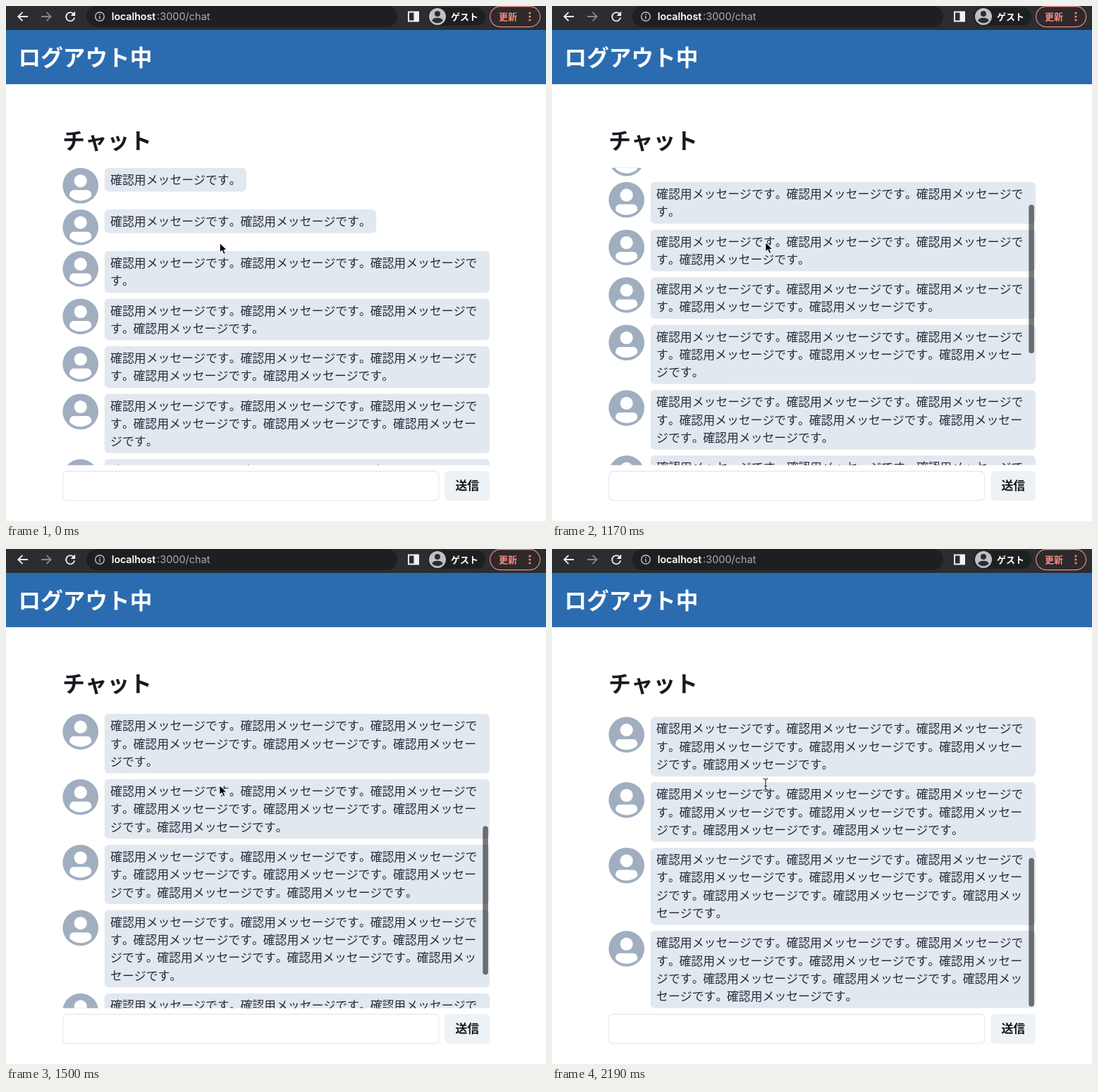
Animation, 766 px wide and 731 px high, one loop 2.22 s. Source, as an HTML page:

```html
<!DOCTYPE html>
<html lang="ja">
<head>
<meta charset="utf-8">
<title>チャット</title>
<style>
  html, body { margin: 0; width: 100%; height: 100%; overflow: hidden; background: #fff; }
  svg { display: block; }
  text { font-family: "Noto Sans CJK JP", "Noto Sans CJK", sans-serif; fill: #17191f; font-kerning: none; }
  .msg { font-size: 16.88px; font-weight: 300; fill: #262c38; }
  .title { font-size: 31.65px; font-weight: 700; }
  .url { font-family: Inter, Roboto, sans-serif; font-size: 14.5px; }
  .line { fill: none; stroke: #f1f3f4; stroke-width: 1.8; }
</style>
</head>
<body>
<svg width="766" height="731" viewBox="0 0 766 731">
  <defs>
    <clipPath id="view"><rect x="80" y="229.7" width="606.5" height="422"/></clipPath>
    <g id="avatar" transform="scale(.3956)" fill="#fff">
      <circle cx="64" cy="64" r="64" fill="#a0aec0"/>
      <circle cx="64" cy="47" r="23"/>
      <path d="M103 102.1C93 112 79.4 118 64 118S35 111.8 25 101.8V95.2C25 86.8 32 80 40.6 80H87.4C96 80 103 86.8 103 95.2Z"/>
    </g>
  </defs>

  <!-- browser bar -->
  <rect width="766" height="34" fill="#2c2d30"/>
  <g class="line">
    <path d="M31 15H17.5M23.5 8.8L17.3 15L23.5 21.2"/>
    <path d="M50 15H63.5M57.5 8.8L63.7 15L57.5 21.2" stroke="#85878b"/>
    <path d="M96.2 11.6A6.1 6.1 0 1 0 97.3 16.4"/>
  </g>
  <path d="M98.2 7.6V14H91.8Z" fill="#f1f3f4"/>
  <rect x="114" y="0" width="441" height="30" rx="15" fill="#1e1f21"/>
  <circle cx="133" cy="15" r="6.3" fill="none" stroke="#bdc1c6" stroke-width="1.4"/>
  <path d="M133 14V18.6M133 11.2V12.7" stroke="#bdc1c6" stroke-width="1.5"/>
  <text class="url" x="149.7" y="20.2" style="fill:#fff;font-weight:600;font-size:14.2px">localhost</text>
  <text class="url" x="214" y="20.2" style="fill:#a9adb2">:3000/chat</text>
  <rect x="571" y="8.5" width="14" height="13" fill="none" stroke="#f1f3f4" stroke-width="2"/>
  <rect x="578.5" y="8" width="7" height="14" fill="#f1f3f4"/>
  <rect x="598" y="2" width="82" height="26" rx="13" fill="#1e1f21"/>
  <circle cx="612" cy="15" r="12" fill="#bdc1c6"/>
  <circle cx="612" cy="11" r="4" fill="#2c2d30"/>
  <path d="M604.3 20.5C605.5 17.4 609 16.7 612 16.7S618.5 17.4 619.7 20.5C617.8 23 615 24.3 612 24.3S606.2 23 604.3 20.5Z" fill="#2c2d30"/>
  <text x="631" y="20" style="fill:#fff;font-size:13px;font-weight:700">ゲスト</text>
  <rect x="686.6" y=".6" width="71" height="29" rx="14.5" fill="#2e292b" stroke="#e58d84" stroke-width="1.2"/>
  <text x="699" y="20" style="fill:#f28b82;font-size:13px;font-weight:700">更新</text>
  <g fill="#f28b82">
    <circle cx="743" cy="10" r="1.6"/><circle cx="743" cy="15" r="1.6"/><circle cx="743" cy="20" r="1.6"/>
  </g>

  <!-- page -->
  <rect y="34" width="766" height="77" fill="#2b6cb0"/>
  <text class="title" x="17.5" y="84.5" style="fill:#fff">ログアウト中</text>
  <text class="title" x="80.3" y="203">チャット</text>
  <g clip-path="url(#view)">
    <g id="list"></g>
    <rect id="thumb" x="676.3" y="232" width="7.6" height="211" rx="3.8" fill="#000" fill-opacity=".53"/>
  </g>
  <rect x="80.8" y="660.4" width="533" height="41.6" rx="6" fill="#fff" stroke="#e2e8f0" stroke-width="1.1"/>
  <rect x="622.4" y="660" width="63.8" height="42.2" rx="6.3" fill="#edf2f7"/>
  <text x="654.3" y="687.3" text-anchor="middle" style="font-size:16.88px;font-weight:700">送信</text>

  <path id="arrow" d="M0 0V14.2L3.3 11.2L5.7 16.6L8.2 15.5L5.9 10.2H10.3Z" fill="#000" stroke="#fff" stroke-width="1.1" stroke-linejoin="round"/>
  <g id="beam" transform="translate(303 334)" fill="none">
    <path d="M-3.5 -8Q0 -8 0 -5.5Q0 -8 3.5 -8M0 -5.5V5.5M-3.5 8Q0 8 0 5.5Q0 8 3.5 8M-2 2.5H2" stroke="#fff" stroke-width="2.6" stroke-opacity=".7"/>
    <path d="M-3.5 -8Q0 -8 0 -5.5Q0 -8 3.5 -8M0 -5.5V5.5M-3.5 8Q0 8 0 5.5Q0 8 3.5 8M-2 2.5H2" stroke="#222" stroke-width="1.1"/>
  </g>
</svg>
<script>
const LOOP = 2220, STEP = 30;
const TOP = 229.7, UNIT = 8.44, LINE = 25.32, AVATAR = 50.64, PER_LINE = 31;
const PHRASE = '確認用メッセージです。', EM = 16.88, STOP_TRIM = 1.4;
const PHRASE_W = PHRASE.length * EM - STOP_TRIM;
const $ = id => document.getElementById(id);

// each sentence starts at its own x, a little closer after a full stop
function textLine(s, y) {
  let x = 148.1;
  const spans = s.split(/(?<=。)/).map(part => {
    const span = `<tspan x="${x}">${part}</tspan>`;
    x += part.length * EM - STOP_TRIM;
    return span;
  });
  return `<text class="msg" y="${y}">${spans.join('')}</text>`;
}

function buildList() {
  let y = 0, html = '';
  for (let n = 1; n <= 10; n++) {
    const lines = PHRASE.repeat(n).match(new RegExp(`.{1,${PER_LINE}}`, 'g'));
    const h = lines.length * LINE + UNIT;
    const w = lines.length > 1 ? 546.2 : n * PHRASE_W + 2 * UNIT;
    html += `<g transform="translate(0 ${y})"><use href="#avatar" x="80.4"/>
      <rect x="139.8" width="${w}" height="${h}" rx="6" fill="#e2e8f0"/>` +
      lines.map((s, i) => textLine(s, 23.2 + i * LINE)).join('') + '</g>';
    y += Math.max(h, AVATAR) + UNIT;
  }
  $('list').innerHTML = html;
}

// [time, scroll offset]
const SCROLL = [
  [0, 0], [960, 0], [990, 1], [1050, 14], [1110, 45], [1170, 98], [1230, 163], [1290, 217.4],
  [1350, 253], [1410, 282], [1500, 316.4], [1620, 359], [1740, 398], [1770, 405], [LOOP, 405]
];

function scrollAt(t) {
  const i = SCROLL.findIndex(p => p[0] > t);
  const [t0, a] = SCROLL[i - 1], [t1, b] = SCROLL[i];
  return a + (b - a) * (t - t0) / (t1 - t0);
}

const show = (id, on) => $(id).setAttribute('visibility', on ? 'visible' : 'hidden');
const move = (id, x, y) => $(id).setAttribute('transform', `translate(${x} ${y})`);

function draw(now) {
  const t = Math.floor((now % LOOP) / STEP) * STEP;
  const s = scrollAt(t);
  move('list', 0, TOP - s);
  move('thumb', 0, s * 0.51);
  show('thumb', t >= 960);
  move('arrow', t < 960 ? 303.2 : 302.8, t < 960 ? 336 : 335);
  show('arrow', t < 1800);
  show('beam', t >= 1800);
}

buildList();
const start = performance.now();
function tick() {
  draw(performance.now() - start);
  requestAnimationFrame(tick);
}
tick();
</script>
</body>
</html>
```
